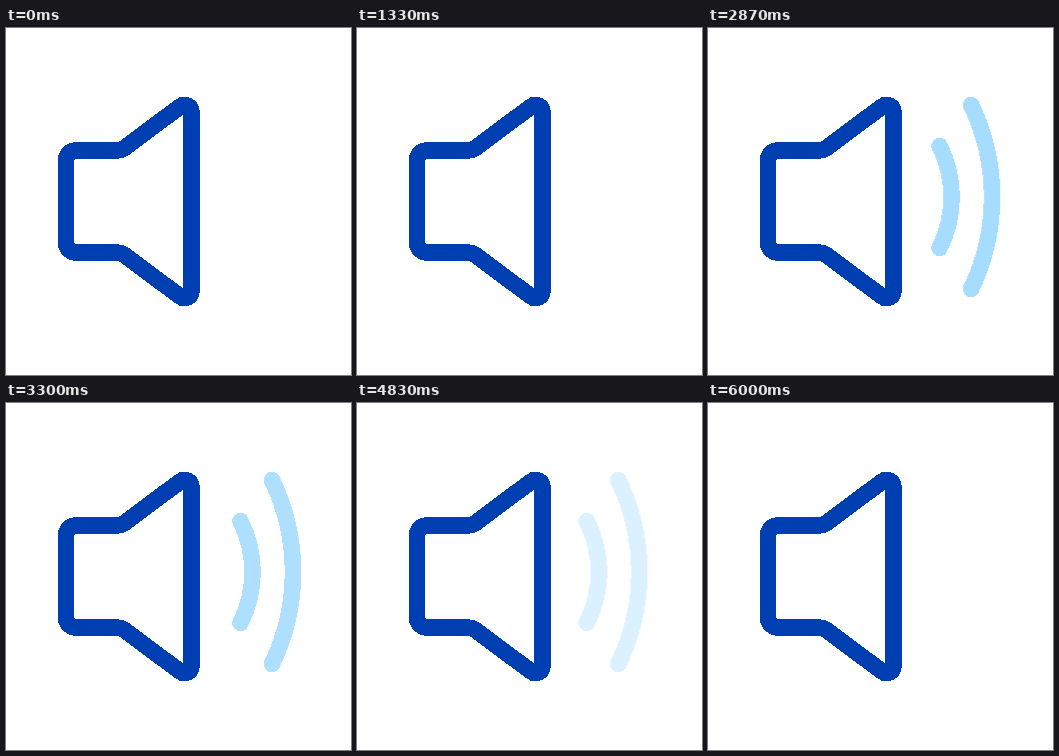
These frames come from a looping animation (345x347 px, 6.96 s). An HTML page without scripts:

```html
<!DOCTYPE html>
<html lang="en">
<head>
<meta charset="utf-8">
<title>Speaker</title>
<style>
  html, body {
    margin: 0;
    width: 100%;
    height: 100%;
    overflow: hidden;
    background: #fff;
  }
  svg {
    display: block;
    width: 100%;
    height: 100%;
    fill: none;
    stroke-width: 16.6;
    stroke-linecap: round;
    stroke-linejoin: round;
    shape-rendering: crispEdges;
  }
  .speaker { stroke: #003fb2; }
  .waves {
    stroke: #a6dcff;
    animation: drift 6960ms var(--start) infinite both, fade 6960ms linear var(--start) infinite both;
  }
  /* Each pulse lasts 1333 ms of the loop */
  @keyframes drift {
    0% { transform: translateX(-2px); animation-timing-function: cubic-bezier(.33, 0, .67, 1); }
    19.15%, 100% { transform: translateX(4px); }
  }
  @keyframes fade {
    0% { opacity: 0; }
    5.75%, 13.4% { opacity: 1; }
    19.15%, 100% { opacity: 0; }
  }
</style>
</head>
<body>
<svg viewBox="0 0 345 347">
  <defs>
    <g id="arcs">
      <path d="M231.5 118A114 114 0 0 1 231.5 220"/>
      <path d="M263 77A212 212 0 0 1 263 261"/>
    </g>
  </defs>
  <path class="speaker" d="M70 122.5H111Q114.5 122.5 117.7 120.5L174.4 78.3A7 7 0 0 1 185.5 84V263A7 7 0 0 1 174.4 268.7L117.7 226.5Q114.5 224.5 111 224.5H70A10 10 0 0 1 60 214.5V132.5A10 10 0 0 1 70 122.5Z"/>
  <use class="waves" href="#arcs" style="--start: 0ms"/>
  <use class="waves" href="#arcs" style="--start: 2333ms"/>
  <use class="waves" href="#arcs" style="--start: 4667ms"/>
</svg>
</body>
</html>
```
